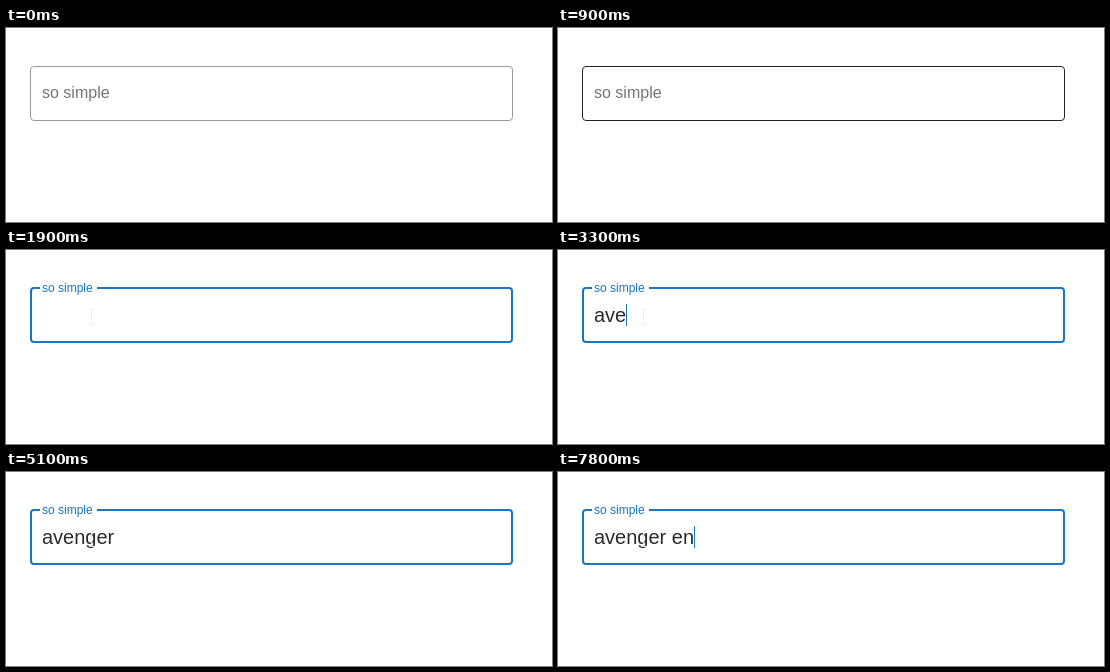
An HTML page for the animation above (8 s loop, 546 by 194 pixels).

```html
<!DOCTYPE html>
<html lang="en">
<head>
<meta charset="utf-8">
<title>Outlined text field</title>
<style>
  html, body { margin: 0; width: 100%; height: 100%; overflow: hidden; background: #fff; }
  svg { display: block; width: 546px; height: 194px; }
  text { font-family: "Liberation Sans", Arial, sans-serif; white-space: pre; }
  #value { font-size: 20px; fill: #2b2b2b; }
  #pointer { fill: none; stroke: #ececec; }
</style>
</head>
<body>
<svg viewBox="0 0 546 194">
  <path id="outline" fill="none"/>
  <text id="label" x="36">so simple</text>
  <text id="value" x="36" y="72"></text>
  <rect id="caret" y="54" width="1" height="22" fill="#1976c0"/>
  <path id="pointer" d="M83 59.5h2M86 59.5h2M85.5 60v14M83 74.5h2M86 74.5h2"/>
</svg>
<script>
const LOOP = 8000, BLUE = '#1976c0', LEFT = 36;

// time, outline colour, stroke, notch end, label colour, label progress
const FIELD = [
  [0,    '#999999', 1, 34, '#747474', 0],
  [800,  '#222222', 1, 34, '#747474', 0],
  [1400, '#1d4b76', 2, 59, '#6482a5', 0.44],
  [1500, '#1b659f', 2, 91, '#3c7bb3', 0.86],
  [1600, '#1a71b5', 2, 91, '#2477bc', 0.98],
  [1700, BLUE,      2, 91, BLUE,      1]
];

// time, typed text, caret shown
const TYPING = [
  [0, '', false], [1400, '', true], [1900, '', false], [2400, '', true],
  [2600, 'a', true], [3100, 'av', true], [3300, 'ave', true],
  [3800, 'aven', true], [4000, 'aveng', true], [4300, 'avenge', true],
  [4600, 'avenger', true], [5100, 'avenger', false],
  [5500, 'avenger ', true], [6000, 'avenger ', false],
  [6100, 'avenger e', true], [6600, 'avenger e', false],
  [6900, 'avenger ', false], [7200, 'avenger ', true],
  [7400, 'avenger e', true], [7800, 'avenger en', true]
];

const el = id => document.getElementById(id);
const [outline, label, value, caret, pointer] =
  ['outline', 'label', 'value', 'caret', 'pointer'].map(el);

const stepAt = (steps, t) => steps.filter(s => s[0] <= t).pop();

function set(node, attrs) {
  for (const name in attrs) node.setAttribute(name, attrs[name]);
}

// Rounded box drawn clockwise from the end of the notch back to its start.
function boxPath(stroke, notchEnd) {
  const h = stroke / 2, r = 4 - h;
  const l = 24 + h, right = 507 - h, top = (stroke > 1 ? 37 : 38) + h, b = 93 - h;
  const arc = (x, y) => `A${r} ${r} 0 0 1 ${x} ${y}`;
  return `M${notchEnd} ${top}H${right - r}${arc(right, top + r)}V${b - r}` +
    `${arc(right - r, b)}H${l + r}${arc(l, b - r)}V${top + r}${arc(l + r, top)}H34`;
}

function draw(t) {
  const [, line, stroke, notchEnd, ink, p] = stepAt(FIELD, t);
  const [, typed, caretOn] = stepAt(TYPING, t);
  set(outline, { d: boxPath(stroke, notchEnd), stroke: line, 'stroke-width': stroke });
  set(label, { y: 70 - 28 * p, 'font-size': 16 - 4 * p, fill: ink });
  value.textContent = typed;
  const width = typed ? value.getComputedTextLength() : 0;
  set(caret, { x: Math.round(LEFT + width), visibility: caretOn ? 'visible' : 'hidden' });
  set(pointer, { visibility: t >= 1400 ? 'visible' : 'hidden' });
}

const start = performance.now();
function tick() {
  draw((performance.now() - start) % LOOP);
  requestAnimationFrame(tick);
}
tick();
</script>
</body>
</html>
```
